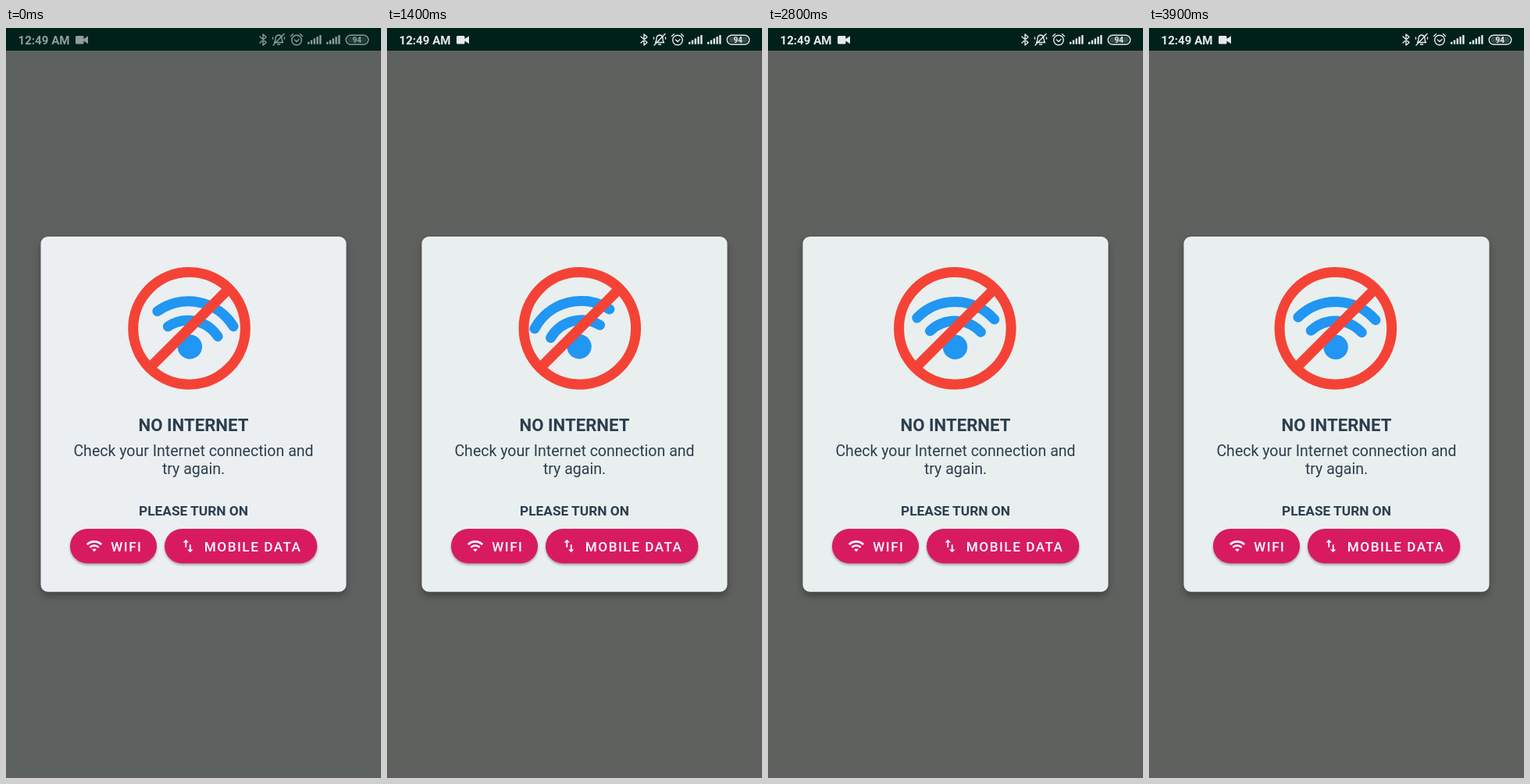
Write an HTML page that moves like this. It is 480 px wide and 960 px high and loops after 4 s.

```html
<!DOCTYPE html>
<html lang="en">
<head>
<meta charset="utf-8">
<title>No internet dialog</title>
<style>
  html, body { margin: 0; width: 100%; height: 100%; overflow: hidden; background: #5f615e; }
  svg { display: block; width: 480px; height: 960px; font-family: Roboto, sans-serif; }
  .card { filter: drop-shadow(0 5px 5px rgba(0, 0, 0, .3)); }
  .pill { fill: #d81b60; filter: drop-shadow(0 2px 1.5px rgba(0, 0, 0, .32)); }
  .ink { fill: #2c3e50; text-anchor: middle; }
  .label { fill: #fff; font-size: 17.11px; font-weight: 500; letter-spacing: 1.53px; }
  .line { fill: none; stroke: #e6ebe9; stroke-width: 1.4; stroke-linecap: round; stroke-linejoin: round; }
</style>
</head>
<body>
<svg viewBox="0 0 480 960">
  <rect id="back" width="480" height="960" fill="#5f615e"/>
  <rect width="480" height="29" fill="#00211a"/>

  <g id="status" fill="#e6ebe9">
    <text x="15.5" y="21" font-size="15.1" font-weight="700">12:49 AM</text>
    <path d="M90.5 10h7.5q1.5 0 1.5 1.5v2.5l5.5-3.8v10l-5.5-3.8v2.6q0 1.5-1.5 1.5h-7.5q-1.500 0-1.500-1.500v-7.500q0-1.500 1.500-1.500z"/>
    <path class="line" d="M325 11l8 7.500-4 3.500v-14l4 3.500-8 7.500"/>
    <path class="line" d="M343.500 18.500h11q-1.500-1.500-1.500-5 0-4-4-4.500-4 .5-4 4.500 0 3.500-1.500 5zM347.500 21h3M342 22l14-14.500M341.500 14v-2M356.500 14v-2"/>
    <g class="line">
      <circle cx="372" cy="15.500" r="6.300"/>
      <path d="M364.500 10.500l3-2.700M379.500 10.500l-3-2.700M369.300 15l2.700 2.500 3-3"/>
    </g>
    <g id="bars"></g>
    <rect class="line" x="435.200" y="9.200" width="28.600" height="11.800" rx="5.900"/>
    <rect x="437.200" y="11.200" width="24.600" height="7.800" rx="3.900" opacity=".22"/>
    <text x="449.300" y="18.700" font-size="10" font-weight="700" text-anchor="middle">94</text>
  </g>

  <rect id="card" class="card" x="44.500" y="267" width="391" height="454.700" rx="9" fill="#e9efee"/>

  <g id="wifi" fill="none" stroke="#2196f3" stroke-width="13" stroke-linecap="round">
    <path d="M190.500 372A67.700 67.700 0 0 1 289.500 372M207.500 388.500A45.900 45.900 0 0 1 272.500 388.500"/>
    <circle cx="240" cy="408.500" r="15.700" fill="#2196f3" stroke="none"/>
  </g>
  <g id="ban" fill="none" stroke="#f44336" stroke-width="13">
    <circle cx="240" cy="384.400" r="71.800"/>
    <path d="M190 434.400L290 334.400"/>
  </g>

  <text class="ink" x="240" y="515.700" font-size="22.200" font-weight="700">NO INTERNET</text>
  <g class="ink" font-size="19.560">
    <text x="240" y="547.700">Check your Internet connection and</text>
    <text x="240" y="570.800">try again.</text>
  </g>
  <text class="ink" x="240" y="624" font-size="17.300" font-weight="700">PLEASE TURN ON</text>

  <rect class="pill" x="82" y="641" width="111" height="44.300" rx="22.150"/>
  <rect class="pill" x="203" y="641" width="195.300" height="44.300" rx="22.150"/>
  <g fill="#fff">
    <path transform="translate(102 652) scale(.917)" d="M1 9l2 2c4.970-4.970 13.030-4.970 18 0l2-2C16.930 2.930 7.080 2.930 1 9zm8 8l3 3 3-3c-1.650-1.660-4.340-1.660-6 0zm-4-4l2 2c2.760-2.760 7.240-2.760 10 0l2-2C15.140 9.140 8.870 9.140 5 13z"/>
    <path transform="translate(222 652) scale(.917)" d="M9 3L5 7h3v7h2V7h3zM16 17v-7h-2v7h-3l4 4 4-4z"/>
  </g>
  <text class="label" x="134.200" y="669.600">WIFI</text>
  <text class="label" x="253.800" y="669.600">MOBILE DATA</text>
</svg>

<script>
  const LOOP = 4000, STEP = 100;
  const SWING = { period: 2060, trough: 250, shift: 7.4, tilt: 2.1 };
  const get = id => document.getElementById(id);
  const [back, status, card, wifi, ban] = ['back', 'status', 'card', 'wifi', 'ban'].map(get);

  // Two signal meters with five rising bars each
  get('bars').innerHTML = [386, 410].map(x =>
    [0, 1, 2, 3, 4].map(i => {
      const h = 3 + i * 2.2;
      return `<rect x="${x + i * 3.8}" y="${20.7 - h}" width="2.4" height="${h}" rx=".6"/>`;
    }).join('')).join('');

  const mix = (a, b, k) => `rgb(${a.map((v, i) => Math.round(v + (b[i] - v) * k))})`;

  function draw(t) {
    const phase = 2 * Math.PI * (t - SWING.trough) / SWING.period;
    const dx = -SWING.shift * Math.cos(phase);
    ban.setAttribute('transform', `translate(${dx - 0.1} 0)`);
    wifi.setAttribute('transform', `rotate(${-SWING.tilt * dx} 240 384.4)`);

    // The status bar brightens at the start of each loop
    const k = Math.min(1, t / 300);
    status.setAttribute('opacity', 0.62 + 0.38 * k);
    back.setAttribute('fill', mix([93, 98, 97], [95, 97, 94], k));
    card.setAttribute('fill', mix([235, 239, 241], [233, 239, 238], k));
  }

  function tick(now) {
    draw(Math.floor((now + 8) % LOOP / STEP) * STEP);
    requestAnimationFrame(tick);
  }
  draw(0);
  requestAnimationFrame(tick);
</script>
</body>
</html>
```
